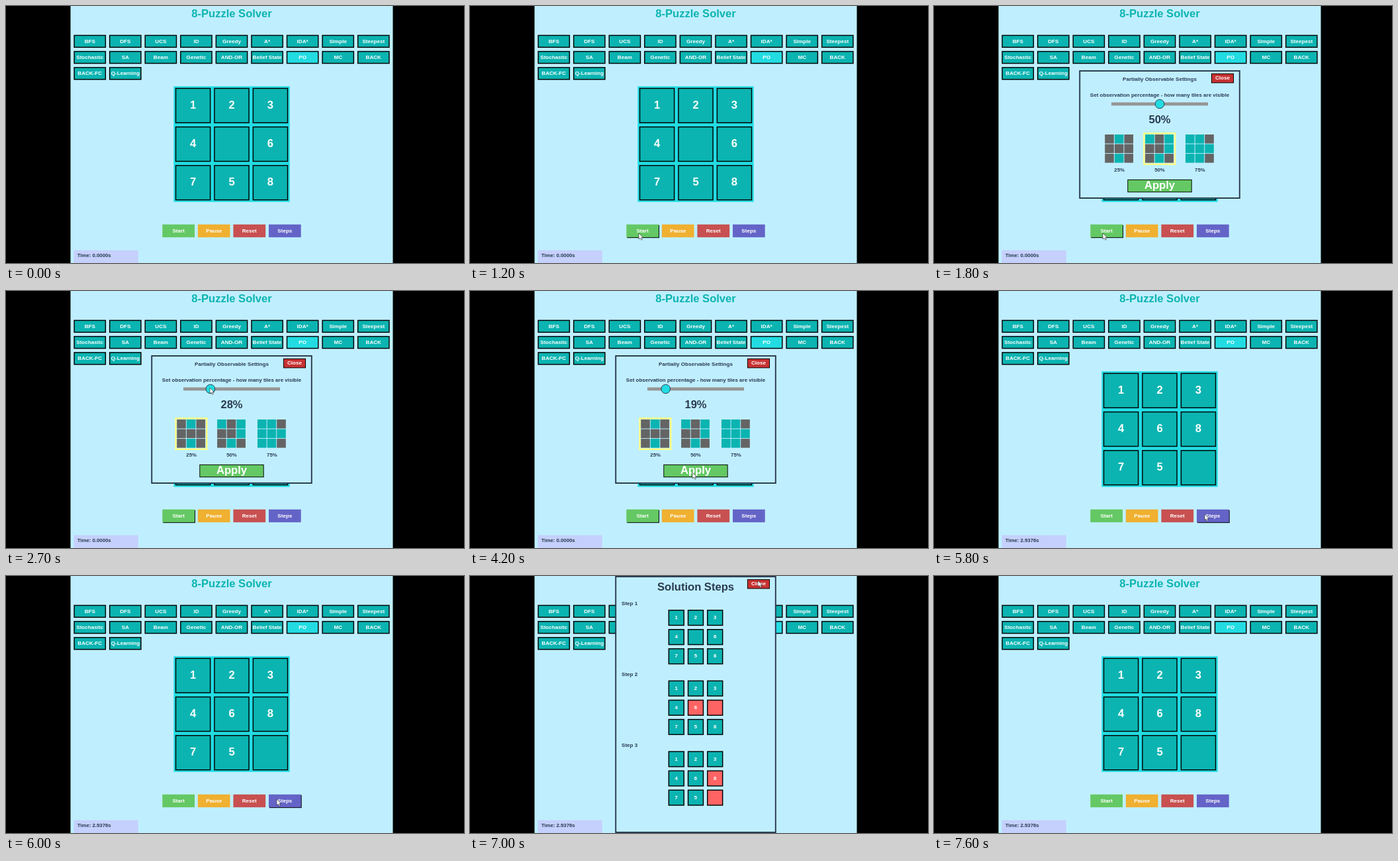
Recreate the animation shown at these times as an HTML page with a canvas. Size 692 by 388 pixels, loop 8700 ms.

```html
<!DOCTYPE html>
<html lang="en">
<head>
<meta charset="utf-8">
<title>8-Puzzle Solver</title>
<style>
  html, body { margin: 0; width: 100%; height: 100%; overflow: hidden; background: #000; }
  canvas { display: block; }
</style>
</head>
<body>
<canvas id="stage" width="692" height="388"></canvas>
<script>
const ctx = document.getElementById('stage').getContext('2d');
const LOOP = 8700, TICK = 100;
const BG = '#bfefff', TEAL = '#0bb4b1', CYAN = '#22dce2', INK = '#2a3a50', GREY = '#646464', RED = '#ff6464';
const SMALL = 16.6, LARGE = 34;

const ALGORITHMS = ['BFS', 'DFS', 'UCS', 'ID', 'Greedy', 'A*', 'IDA*', 'Simple', 'Steepest',
  'Stochastic', 'SA', 'Beam', 'Genetic', 'AND-OR', 'Belief State', 'PO', 'MC', 'BACK', 'BACK-FC', 'Q-Learning'];
const CONTROLS = [['Start', '#64c864'], ['Pause', '#f0b030'], ['Reset', '#c85050'], ['Steps', '#6464c8']];
const PRESETS = [[25, '010000010'], [50, '101001010'], [75, '110111110']];
const BOARDS = ['1234 6758', '12346 758', '12346875 '];

// Timeline (ms)
const SETTINGS_OPEN = 1600, SETTINGS_CLOSE = 4500, MOVES = [4800, 5100];
const STEPS_OPEN = 6100, STEPS_CLOSE = 7200;
const POINTER = [ // time, x, y in stage pixels
  [400, 300, 390], [1000, 255, 343], [1800, 255, 343], [2300, 341, 146], [2700, 308, 146],
  [3200, 295, 146], [3600, 295, 146], [4200, 336, 274], [5400, 336, 274], [5800, 409, 337],
  [6300, 409, 337], [7000, 435, 7], [7200, 435, 7], [7600, 425, 390]];
const SLIDER = [[2300, 50], [2700, 28], [3200, 19]];

const within = (t, from, to) => t >= from && t < to;

// Eased interpolation of keyframes [time, ...values]
function sample(keys, t) {
  const next = keys.findIndex(k => k[0] > t);
  if (next < 0) return keys[keys.length - 1].slice(1);
  if (next === 0) return keys[0].slice(1);
  const a = keys[next - 1], b = keys[next];
  const u = (t - a[0]) / (b[0] - a[0]), e = u * u * (3 - 2 * u);
  return a.slice(1).map((v, i) => v + (b[i + 1] - v) * e);
}

function text(str, x, y, size = SMALL, color = INK, align = 'center') {
  ctx.font = `bold ${size}px "Liberation Sans", Arial, sans-serif`;
  ctx.textAlign = align;
  ctx.textBaseline = 'middle';
  ctx.fillStyle = color;
  ctx.fillText(str, x, y);
}

function box(x, y, w, h, fill, border = 0, stroke = '#000') {
  ctx.fillStyle = stroke;
  if (border) ctx.fillRect(x, y, w, h);
  ctx.fillStyle = fill;
  ctx.fillRect(x + border, y + border, w - 2 * border, h - 2 * border);
}

function button(label, x, y, w, h, fill, border = 0, size = SMALL) {
  box(x, y, w, h, fill, border);
  text(label, x + w / 2, y + h / 2, size, '#fff');
}

function board(cells, x, y, size, pitch, fontSize, previous = cells) {
  [...cells].forEach((digit, i) => button(digit, x + i % 3 * pitch, y + Math.floor(i / 3) * pitch,
    size, size, digit === previous[i] ? TEAL : RED, 3, fontSize));
}

function mainScreen(t) {
  box(0, 0, 1000, 800, BG);
  text('8-Puzzle Solver', 500, 26, LARGE, TEAL);
  ALGORITHMS.forEach((name, i) =>
    button(name, 10 + i % 9 * 110, 90 + Math.floor(i / 9) * 50, 100, 40, name === 'PO' ? CYAN : TEAL, 3));
  box(320, 250, 360, 360, CYAN);
  board(BOARDS[MOVES.filter(m => t >= m).length], 325, 255, 110, 120, LARGE);

  const hovered = within(t, 1000, SETTINGS_CLOSE) ? 'Start' : within(t, 5700, STEPS_CLOSE) ? 'Steps' : '';
  CONTROLS.forEach(([name, color], i) => {
    const x = 285 + i * 110;
    if (name === hovered) box(x + 2, 682, 100, 40, '#000');
    button(name, x, 680, 100, 40, color);
  });
  box(10, 760, 200, 40, '#c5d0fd');
  text(`Time: ${t < SETTINGS_CLOSE ? '0.0000' : '2.9376'}s`, 21, 778, 16, INK, 'left');
}

function settingsDialog(t) {
  const percent = Math.round(sample(SLIDER, t)[0]);
  box(250, 200, 500, 400, BG, 4, INK);
  text('Partially Observable Settings', 500, 228);
  button('Close', 660, 210, 70, 30, '#c83232', 2);
  text('Set observation percentage - how many tiles are visible', 500, 277, 16.4);

  box(350, 300, 300, 10, '#969696');
  ctx.beginPath();
  ctx.arc(350 + percent * 3, 305, 14, 0, 2 * Math.PI);
  ctx.fillStyle = CYAN;
  ctx.fill();
  ctx.strokeStyle = INK;
  ctx.lineWidth = 2;
  ctx.stroke();
  text(percent + '%', 500, 355, LARGE);

  PRESETS.forEach(([value, pattern], i) => {
    const x = 330 + i * 125;
    if (Math.abs(percent - value) < 12.5) box(x - 6, 394, 101, 101, BG, 5, '#ffff80');
    [...pattern].forEach((visible, k) =>
      box(x + k % 3 * 30, 400 + Math.floor(k / 3) * 30, 28, 28, visible === '1' ? TEAL : GREY));
    text(value + '%', x + 45, 512, 16);
  });
  button('Apply', 400, 540, 200, 40, '#64c864', 2, LARGE);
}

function stepsDialog() {
  box(250, 0, 500, 800, BG, 4, INK);
  text('Solution Steps', 500, 36, LARGE);
  button('Close', 660, 10, 70, 30, '#c83232', 2);
  BOARDS.forEach((cells, i) => {
    text(`Step ${i + 1}`, 270, 87 + i * 220, SMALL, INK, 'left');
    board(cells, 415, 105 + i * 220, 50, 60, 16, BOARDS[Math.max(0, i - 1)]);
  });
}

function pointer(t) {
  if (!within(t, POINTER[0][0], POINTER[POINTER.length - 1][0])) return;
  const [x, y] = sample(POINTER, t);
  ctx.setTransform(1, 0, 0, 1, x, y);
  const arrow = new Path2D('M0 0V9L2.2 7.2L3.8 10.4L5.4 9.6L3.9 6.6H6.6Z');
  ctx.fillStyle = '#fff';
  ctx.fill(arrow);
  ctx.strokeStyle = '#222';
  ctx.lineWidth = 0.6;
  ctx.stroke(arrow);
}

function draw(now) {
  const t = Math.floor(now % LOOP / TICK) * TICK;
  ctx.setTransform(1, 0, 0, 1, 0, 0);
  box(0, 0, 692, 388, '#000');
  // The app window is 1000 x 800 units
  ctx.setTransform(0.487, 0, 0, 0.485, 97.5, 0);
  mainScreen(t);
  if (within(t, SETTINGS_OPEN, SETTINGS_CLOSE)) settingsDialog(t);
  if (within(t, STEPS_OPEN, STEPS_CLOSE)) stepsDialog();
  pointer(t);
}

const start = performance.now();
function loop() {
  draw(performance.now() - start);
  requestAnimationFrame(loop);
}
loop();
</script>
</body>
</html>
```
